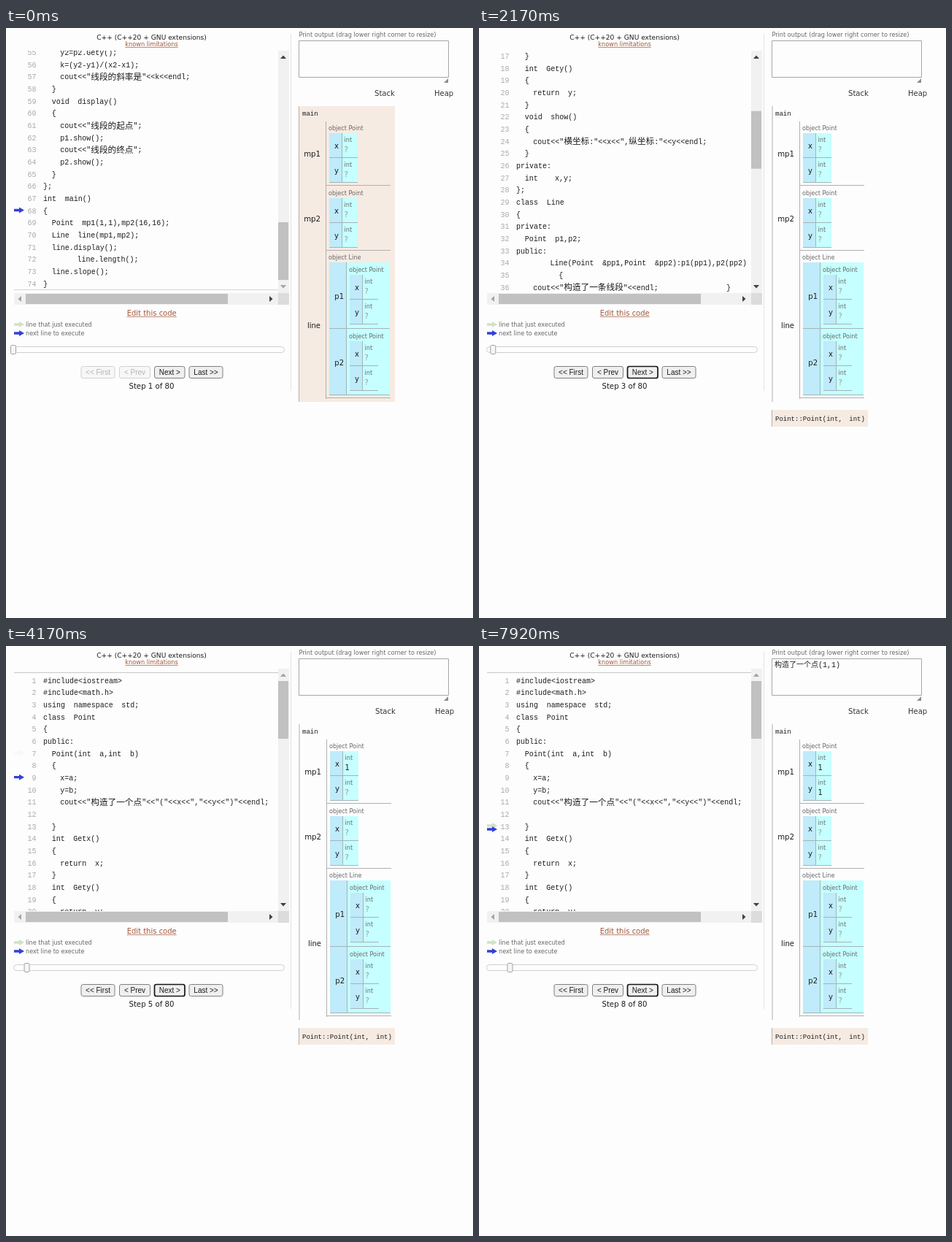
Animation of 640x808 px, one loop 8 s. Source, as an HTML page with a canvas:

```html
<!DOCTYPE html>
<html lang="en">
<head>
<meta charset="utf-8">
<title>C++ step visualizer</title>
<style>
  html, body { margin: 0; width: 100%; height: 100%; overflow: hidden; background: #fdfdfd; }
  canvas { display: block; width: 640px; height: 808px; }
</style>
</head>
<body>
<canvas id="stage" width="640" height="808"></canvas>
<script>
const ctx = document.getElementById('stage').getContext('2d');
const LOOP = 8000, PITCH = 16.67, MAX_SCROLL = 913.7;
const SANS = '"DejaVu Sans", sans-serif';
const MONO = '"Liberation Mono", monospace';
const CJK = '"Noto Sans CJK SC", "Noto Sans CJK", sans-serif';
const BG = '#fdfdfd', HILITE = '#f6ebe2', KEY = '#bfebfa', VALUE = '#c6ffff';
const GREY = '#666', INK = '#1c1c1c', LINK = '#a2583d', LINE = '#b0b0b0';
const GREEN = '#cfe2c6', BLUE = '#343fd8';

// One leading blank per indent level; every blank is full width.
const code = `#include<iostream>
#include<math.h>
using namespace std;
class Point
{
public:
 Point(int a,int b)
 {
  x=a;
  y=b;
  cout<<"构造了一个点"<<"("<<x<<","<<y<<")"<<endl;

 }
 int Getx()
 {
  return x;
 }
 int Gety()
 {
  return y;
 }
 void show()
 {
  cout<<"横坐标:"<<x<<",纵坐标:"<<y<<endl;
 }
private:
 int  x,y;
};
class Line
{
private:
 Point p1,p2;
public:
    Line(Point &pp1,Point &pp2):p1(pp1),p2(pp2)
     {
  cout<<"构造了一条线段"<<endl;        }
 void length()
 {
  double x1,x2,y1,y2,len;
  x1=p1.Getx();
  y1=p1.Gety();
  x2=p2.Getx();
  y2=p2.Gety();
  len=sqrt((x2-x1)*(x2-x1)+(y2-y1)*(y2-y1));
  cout<<"线段的长度是"<<len<<endl;
 }
 void slope()
 {
  double k;
  double x1,x2,y1,y2;

  x1=p1.Getx();
  y1=p1.Gety();
  x2=p2.Getx();
  y2=p2.Gety();
  k=(y2-y1)/(x2-x1);
  cout<<"线段的斜率是"<<k<<endl;
 }
 void display()
 {
  cout<<"线段的起点";
  p1.show();
  cout<<"线段的终点";
  p2.show();
 }
};
int main()
{
 Point mp1(1,1),mp2(16,16);
 Line line(mp1,mp2);
 line.display();
    line.length();
 line.slope();
}`.split('\n');

// at: start, prev/cur: lines of the two arrows, lag: delay before they move
const steps = [
  { at: 0, prev: 0, cur: 68, lag: 0 },
  { at: 920, prev: 0, cur: 68, lag: 0 },
  { at: 1750, prev: 0, cur: 7, lag: 230 },
  { at: 3000, prev: 7, cur: 9, lag: 0 },
  { at: 4000, prev: 9, cur: 10, lag: 0 },
  { at: 5080, prev: 10, cur: 11, lag: 0 },
  { at: 5920, prev: 11, cur: 13, lag: 175 },
  { at: 7080, prev: 13, cur: 13, lag: 0 }
];

const clamp = v => Math.max(0, Math.min(1, v));
const mix = (a, b, k) => a + (b - a) * k;
const cubic = k => k < .5 ? 4 * k ** 3 : 1 - 4 * (1 - k) ** 3;
const swing = k => .5 - .5 * Math.cos(Math.PI * k);
const lineY = n => 47 + (n - 1) * PITCH;

function rect(x, y, w, h, fill) {
  ctx.fillStyle = fill;
  ctx.fillRect(x, y, w, h);
}

function box(x, y, w, h, r, fill, stroke, width = 1) {
  ctx.beginPath();
  ctx.roundRect(x, y, w, h, r);
  ctx.fillStyle = fill;
  ctx.fill();
  ctx.strokeStyle = stroke;
  ctx.lineWidth = width;
  ctx.stroke();
}

// y is the middle of the capitals
function text(s, x, y, size, color = INK, align = 'left', family = SANS) {
  ctx.font = `${size}px ${family}`;
  ctx.fillStyle = color;
  ctx.textAlign = align;
  ctx.fillText(s, x, y + size * .36);
}

function link(s, x, y, size) {
  text(s, x, y, size, LINK, 'center');
  const w = ctx.measureText(s).width;
  rect(x - w / 2, Math.round(y + size * .36 + 1), w, 1, '#bf8a76');
}

function mono(s, x, y, size, wide) {
  for (const run of s.match(/ +|[\u3000-\u9fff]+|[!-~]+/g) || []) {
    if (run[0] === ' ') { x += run.length * wide; continue; }
    const isCjk = run[0] > '~';
    text(run, x, y, isCjk ? wide : size, INK, 'left', isCjk ? CJK : MONO);
    x += ctx.measureText(run).width;
  }
}

function poly(points, color) {
  ctx.beginPath();
  points.forEach(([x, y]) => ctx.lineTo(x, y));
  ctx.fillStyle = color;
  ctx.fill();
}

function arrow(y, color) {
  poly([[11, y - 1.7], [18, y - 1.7], [18, y - 4], [25, y], [18, y + 4], [18, y + 1.7], [11, y + 1.7]], color);
}

function triangle(x, y, dx, dy, on) {
  poly([[x + dx * 2.5, y + dy * 2.5],
        [x - dx * 2 + dy * 4, y - dy * 2 + dx * 4],
        [x - dx * 2 - dy * 4, y - dy * 2 - dx * 4]], on ? '#404040' : '#a3a3a3');
}

function arrows(t, i, scroll) {
  const s = steps[i], old = steps[i - 1] || s;
  const u = t - s.at - s.lag, same = s.prev === s.cur;
  if (u >= 200) {
    if (s.prev) arrow(lineY(s.prev) - scroll - 1, GREEN);
  } else if (old.prev) {
    ctx.globalAlpha = 1 - clamp((t - s.at) / 200);
    arrow(lineY(old.prev) - scroll - 1, GREEN);
    ctx.globalAlpha = 1;
  }
  const from = lineY(old.cur) - .7, to = lineY(s.cur) + (same ? 4 : -.7);
  arrow(mix(from, to, cubic(clamp((u - 200) / 250))) - scroll, BLUE);
}

function codePane(t, i) {
  const scroll = MAX_SCROLL * (1 - swing(clamp((t - 1981) / 300)));
  ctx.save();
  ctx.beginPath();
  ctx.rect(6, 31, 367, 332);
  ctx.clip();
  rect(11, Math.round(36 - scroll), 362, 1, '#c8c8c8');
  rect(11, Math.round(1271.7 - scroll), 362, 1, '#d4d4d4');
  code.forEach((s, n) => {
    const y = lineY(n + 1) - scroll;
    if (y < 20 || y > 375) return;
    text(n + 1, 41.5, y, 10, '#aaa', 'right', MONO);
    mono(s, 51, y, 10, 11.65);
  });
  arrows(t, i, scroll);
  ctx.restore();

  const track = '#f1f1f1', thumb = '#c1c1c1';
  rect(373, 31, 15, 332, track);
  rect(373, 48 + 218 * scroll / MAX_SCROLL, 14, 79, thumb);
  triangle(380, 40, 0, -1, scroll > 0);
  triangle(380, 354, 0, 1, scroll < MAX_SCROLL);
  rect(11, 363, 362, 16, track);
  rect(27, 364, 277, 14, thumb);
  triangle(19, 371, -1, 0, false);
  triangle(363, 371, 1, 0, true);
  rect(373, 363, 15, 16, '#dcdcdc');
}

function button(label, x, w, on, focus) {
  box(x + .5, 463.5, w, 16, 2.5, on ? '#efefef' : '#f7f7f7',
      focus ? '#151515' : on ? '#808080' : '#d2d2d2', focus ? 1.7 : 1);
  text(label, x + .5 + w / 2, 471.5, 10, on ? INK : '#b4b4b4', 'center', '"Liberation Sans", sans-serif');
}

function controls(t, i) {
  text('C++ (C++20 + GNU extensions)', 199.5, 12.5, 9.1, INK, 'center');
  link('known limitations', 199.5, 22.5, 8.2);
  link('Edit this code', 199.7, 390, 10);
  arrow(406, GREEN);
  arrow(418, BLUE);
  text('line that just executed', 27, 406.5, 8.1, GREY);
  text('next line to execute', 27, 418.5, 8.1, GREY);
  box(10.5, 436.5, 371, 8, 4, '#fdfdfd', '#d0d0d0');
  box(6.5 + i * 4.64, 434.5, 7, 12, 2, '#f6f6f6', '#a0a0a0');
  button('<< First', 102.5, 46, i > 0);
  button('< Prev', 155, 42, i > 0);
  button('Next >', 203, 41.5, true, t >= 830);
  button('Last >>', 250.5, 46, true);
  text(`Step ${i + 1} of 80`, 199.5, 490.5, 10.2, INK, 'center');
}

function cells(x, y, w, h, key, split) {
  rect(x, y, key, h, KEY);
  rect(x + key, y, w - key, h, VALUE);
  rect(x + key, y, 1, h, '#a4b4b8');
  rect(x, y + split, w, 1, '#a4b4b8');
  rect(x, y + h, w, 1, '#a4b4b8');
}

function point(x, y, values) {
  text('object Point', x - 1, y - 7, 8.1, GREY);
  cells(x, y, 39, 67, 17, 33);
  ['x', 'y'].forEach((name, k) => {
    const top = y + k * 34, v = values[k];
    text(name, x + 13, top + 17, 10, INK, 'right');
    text('int', x + 20.5, top + 9.5, 8.1, GREY);
    text(v, x + 20.5, top + 22.5, 10, v === '?' ? '#929c9c' : INK);
  });
}

function stack(i) {
  const inside = i >= 2, d = inside ? 1 : 0, none = ['?', '?'];
  if (!inside) rect(401, 107, 132, 405, HILITE);
  rect(401 + d * .5, 107, 1, 405, LINE);
  mono('main', 406, 117, 9, 9);
  rect(438 + d, 128, 1, 380, LINE);
  [215, 304, 506].forEach(y => rect(439 + d, y, 88, 1, LINE));
  text('mp1', 431 + d, 172.5, 10.2, INK, 'right');
  text('mp2', 431 + d, 261.5, 10.2, INK, 'right');
  text('line', 431 + d, 407, 10, INK, 'right');
  point(443 + d, 144, [i >= 4 ? '1' : '?', i >= 5 ? '1' : '?']);
  point(443 + d, 233, none);
  text('object Line', 442 + d, 314, 8.1, GREY);
  cells(443 + d, 321, 83, 181, 23, 90);
  ['p1', 'p2'].forEach((name, k) => {
    text(name, 463 + d, 367 + k * 91, 10, INK, 'right');
    point(471 + d, 338 + k * 91, none);
  });
  if (inside) {
    rect(401, 523, 132, 23, HILITE);
    rect(401, 523, 1, 23, LINE);
    mono('Point::Point(int, int)', 406, 534.5, 9, 9.5);
  }
}

function output(i) {
  const d = i >= 2 ? 1 : 0;
  rect(390, 8, 1, 489, '#e2e2e2');
  text('Print output (drag lower right corner to resize)', 401.5, 9, 8.15, GREY);
  box(401.5, 17.5, 205, 50, 0, BG, '#a6a6a6');
  poly([[606, 69], [606, 75], [600, 75]], '#8c8c8c');
  if (i >= 6) mono('构造了一个点(1,1)', 405, 25.5, 10, 10);
  text('Stack', 505 + d, 89.5, 10.1, '#333');
  text('Heap', 587 + d, 89.5, 10, '#333');
}

function draw(t) {
  const i = steps.filter(s => s.at <= t).length - 1;
  rect(0, 0, 640, 808, BG);
  codePane(t, i);
  controls(t, i);
  output(i);
  stack(i);
}

function snap(ms) {
  const tick = Math.floor((ms + 4) * 12 / 1000);
  return Math.round(tick * 25 / 3) * 10;
}

const start = performance.now();
function frame() {
  draw(snap((performance.now() - start) % LOOP) % LOOP);
  requestAnimationFrame(frame);
}
frame();
</script>
</body>
</html>
```
